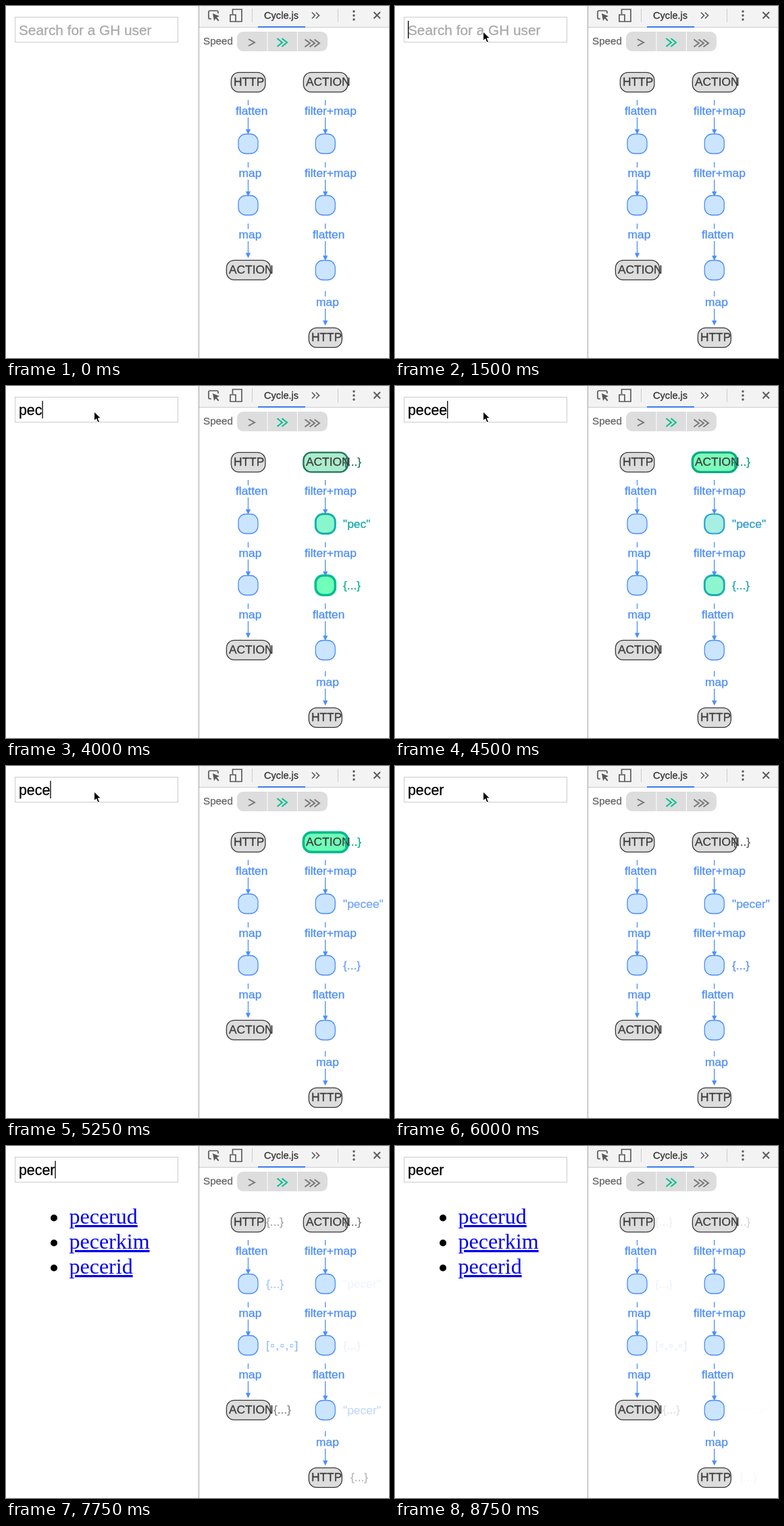
Animation of 567x521 px, one loop 9000 ms. Source, as an HTML page:

```html
<!DOCTYPE html>
<html lang="en">
<head>
<meta charset="utf-8">
<title>Stream graph devtool</title>
<style>
  html, body { margin: 0; width: 100%; height: 100%; overflow: hidden; background: #fff; }
  svg { display: block; width: 567px; height: 521px; }
  text {
    font-family: "Liberation Sans", Arial, sans-serif; white-space: pre;
    fill: currentColor; stroke: currentColor; stroke-width: .3;
  }
  #graph text { font-size: 17.4px; }
  .edge { stroke: #4c8dfb; stroke-width: 1.3; fill: none; }
  .head { fill: #4c8dfb; }
  .label { color: #4c8dfb; }
  .name { color: #3c3c3c; }
  #list text { font: 32px "Liberation Serif", Times, serif; color: #00e; text-decoration: underline; stroke: none; }
  .icon { fill: none; stroke: #5a5a5a; stroke-width: 1.7; }
</style>
</head>
<body>
<svg viewBox="0 0 567 521">
  <rect x="13.5" y="16.5" width="241" height="37" fill="#fff" stroke="#ccc"/>
  <text id="hint" x="19" y="43" font-size="20.8" color="#a9a9a9">Search for a GH user</text>
  <text id="typed" x="19" y="43" font-size="21.33"></text>
  <rect id="caret" y="22" width="1.3" height="26"/>
  <g id="list"></g>

  <path d="M285.5 0V521" stroke="#a3a3a3"/>
  <rect x="286" width="281" height="31" fill="#f3f3f3"/>
  <path d="M286 31.5H567" stroke="#ccc"/>
  <path d="M364.5 4V24M491.5 4V24" stroke="#ccc"/>
  <rect x="373" y="30" width="70" height="2" fill="#3b7ded"/>
  <g class="icon">
    <path d="M304 19H302Q300 19 300 17V9Q300 7 302 7H312Q314 7 314 9V11"/>
    <path d="M306 11L316 15L312 17L315.5 21L314 22.500L310.500 18.500L308 22Z" fill="#5a5a5a" stroke="none"/>
    <path d="M335.500 12V5H349V23H340M332 13H340V23H332Z"/>
    <path d="M453 9.500L457.500 14L453 18.500M459 9.500L463.500 14L459 18.500"/>
    <path d="M544.500 9L554 18.500M554 9L544.500 18.500" stroke-width="2"/>
  </g>
  <g fill="#5a5a5a"><circle cx="515" cy="8" r="1.7"/><circle cx="515" cy="14" r="1.7"/><circle cx="515" cy="20" r="1.7"/></g>
  <text x="382" y="19" font-size="14.6" color="#333">Cycle.js</text>

  <text x="292" y="57" font-size="15.2" color="#666">Speed</text>
  <rect x="342" y="38" width="134" height="29" rx="9" fill="#ddd"/>
  <path d="M387 38V67M431.500 38V67" stroke="#fff"/>
  <g fill="none" stroke="#777" stroke-width="2">
    <path d="M359 49L368 54L359 59"/>
    <path d="M401.500 48L409 54L401.500 60M408.500 48L416 54L408.500 60" stroke="#00bf8f"/>
    <path d="M442.500 49.500L450 55L442.500 60.500M449.500 49.500L457 55L449.500 60.500M456.500 49.500L464 55L456.500 60.500"/>
  </g>

  <g id="graph"></g>
  <path id="cursor" d="M0 0V13.500L3.200 10.600L5.500 16L8 15L5.700 9.800H10Z" fill="#000" stroke="#fff" stroke-width="1"/>
</svg>
<script>
const $ = id => document.getElementById(id);
const LOOP = 9000, STEP = 250, HOP = 100;
const GLOW = 380, FADE_DELAY = 350, FADE = 2450;

function add(parent, tag, attrs, text = '') {
  const el = document.createElementNS('http://www.w3.org/2000/svg', tag);
  for (const key in attrs) el.setAttribute(key, attrs[key]);
  el.textContent = text;
  parent.append(el);
  return el;
}

// Keystrokes: time and field content
const keys = [[2590, 'p'], [3150, 'pe'], [3740, 'pec'], [4120, 'pece'],
              [4400, 'pecee'], [5190, 'pece'], [5340, 'pecer']];
const OBJ = '{...}', ARR = '[▫,▫,▫]', LIST_TIME = 6700;
const pulses = (hops, value) => keys.map(([t, text]) => [t + 50 + hops * HOP, value || `"${text}"`]);

const names = ['pecerud', 'pecerkim', 'pecerid'];
names.forEach((name, i) => {
  add($('list'), 'circle', { cx: 71, cy: 106.5 + 37 * i, r: 5 });
  add($('list'), 'text', { x: 93.5, y: 115 + 37 * i }, name);
});

function edge(x, top, bottom, label, labelX) {
  const g = $('graph');
  add(g, 'path', { class: 'edge', d: `M${x} ${top}V${top + 8}M${x} ${top + 26}V${bottom - 6}` });
  add(g, 'path', { class: 'head', d: `M${x - 3.7} ${bottom - 7.5}H${x + 3.7}L${x} ${bottom}Z` });
  add(g, 'text', { class: 'label', x: labelX, y: top + 22 }, label);
}
edge(358.5, 139, 190, 'flatten', 340);
edge(358.5, 231, 282, 'map', 344.5);
edge(358.5, 322, 373, 'map', 344.5);
edge(472.7, 139, 190, 'filter+map', 442);
edge(472.7, 231, 282, 'filter+map', 442);
edge(472.7, 322, 377, 'flatten', 454);
edge(472.7, 422, 473, 'map', 459);

const BLUE = { fill: [204, 229, 255], line: [76, 141, 251], text: [76, 141, 251] };
const GREY = { fill: [221, 221, 221], line: [56, 56, 56], text: [60, 60, 60] };
const GREEN = { fill: [109, 255, 182], line: [0, 191, 143], text: [0, 179, 134] };

function node(x, y, width, valueX, events, label) {
  const g = $('graph');
  const box = add(g, 'rect', { x, y, width, height: 29, rx: label ? 11.5 : 11 });
  if (label) add(g, 'text', { class: 'name', x: x + 3.5, y: y + 19.5 }, label);
  const value = add(g, 'text', { x: valueX, y: y + 20 });
  return { box, value, events, base: label ? GREY : BLUE };
}

const nodes = [
  node(333.4, 98.4, 50.5, 385, [[6440, OBJ]], 'HTTP'),
  node(344, 189.5, 29, 385, [[6540, OBJ]]),
  node(344, 280.5, 29, 385, [[6700, ARR]]),
  node(326.4, 376.4, 65, 396, [[6740, OBJ]], 'ACTION'),
  node(440.4, 98.4, 65.5, 500, [...pulses(0, OBJ), [6850, OBJ]], 'ACTION'),
  node(458.3, 189.5, 29, 499, pulses(1)),
  node(458.3, 280.5, 29, 499, pulses(2, OBJ)),
  node(458.3, 376.5, 29, 499, [[6150, '"pecer"']]),
  node(448.4, 476.4, 49, 510, [[6250, OBJ]], 'HTTP')
];

const clamp = v => Math.min(1, Math.max(0, v));
const mix = (a, b, k) => `rgb(${a.map((v, i) => Math.round(v + (b[i] - v) * k))})`;
const latest = (list, t) => list.filter(item => item[0] <= t).pop();

function drawNode({ box, value, events, base }, t) {
  const event = latest(events, t);
  const age = event ? t - event[0] : Infinity;
  const glow = clamp(1 - age / GLOW);
  box.setAttribute('fill', mix(base.fill, GREEN.fill, glow));
  box.setAttribute('stroke', mix(base.line, GREEN.line, glow));
  box.setAttribute('stroke-width', 1.3 + 2.4 * glow);
  value.textContent = event ? event[1] : '';
  value.setAttribute('letter-spacing', value.textContent === ARR ? 1.6 : 0);
  value.setAttribute('color', mix(base.text, GREEN.text, glow));
  value.setAttribute('opacity', (1 - clamp((age - FADE_DELAY) / FADE)) ** 1.6);
}

const FOCUS = 1500, BLUR = 8250;
const pointer = [[250, 176, 7], [500, 154, 43], [1250, 143, 41], [1500, 130.5, 38]];
const POINTER_GONE = 7500;

function show(el, on) { el.style.display = on ? '' : 'none'; }

function draw(t) {
  const key = latest(keys, t);
  $('typed').textContent = key ? key[1] : '';
  show($('hint'), !key);

  const sinceInput = t - (key ? key[0] : FOCUS);
  show($('caret'), t >= FOCUS && t < BLUR && sinceInput % 1000 < 500);
  $('caret').setAttribute('x', 19 + (key ? $('typed').getComputedTextLength() : 0));

  show($('list'), t >= LIST_TIME);
  nodes.forEach(n => drawNode(n, t));

  const spot = latest(pointer, t);
  show($('cursor'), spot && t < POINTER_GONE);
  if (spot) $('cursor').setAttribute('transform', `translate(${spot[1]} ${spot[2]})`);
}

const start = performance.now();
function tick(now) {
  const t = Math.max(0, now - start) % LOOP;
  draw(Math.floor(t / STEP) * STEP);
  requestAnimationFrame(tick);
}
draw(0);
requestAnimationFrame(tick);
</script>
</body>
</html>
```
